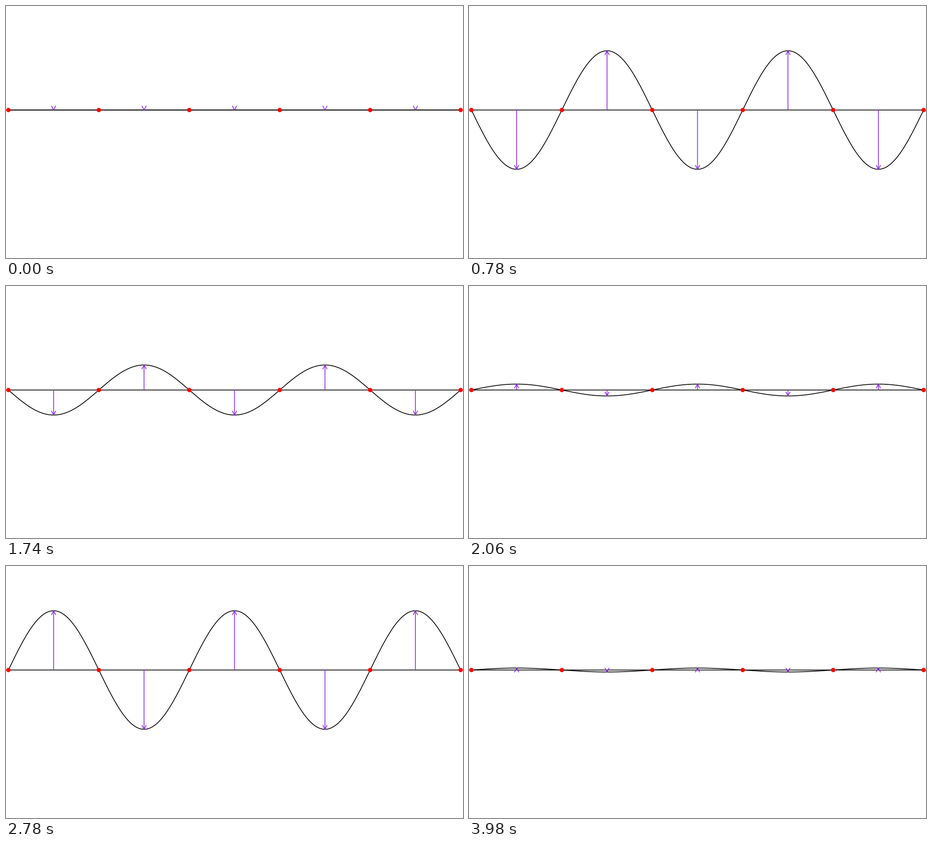
These frames come from a looping animation (1007 by 556 pixels, 4 s). A matplotlib script:

```python
import numpy as np
import matplotlib.pyplot as plt
from matplotlib.animation import FuncAnimation
from matplotlib.patches import Circle

W, H, DPI = 1007, 556, 72
FRAMES, INTERVAL = 200, 20
LOOPS, STEP, AMP = 5, 199.3, 139
XC, YC = W / 2, 229.5
X0, X1 = XC - LOOPS * STEP / 2, XC + LOOPS * STEP / 2
HEAD_W, HEAD_H = 4.8, 9.3
VIOLET = "blueviolet"

fig = plt.figure(figsize=(W / DPI, H / DPI), dpi=DPI, facecolor="white")
ax = fig.add_axes([0, 0, 1, 1])
ax.set(xlim=(0, W), ylim=(H, 0))
ax.axis("off")


def stroke(color, z):
    line, = ax.plot([], [], color=color, lw=1.7, zorder=z, snap=False,
                    solid_capstyle="butt", solid_joinstyle="miter")
    return line


x = np.linspace(X0, X1, 501)
shape = np.sin(np.pi * (x - X0) / STEP)
crests = X0 + STEP * (np.arange(LOOPS) + 0.5)
signs = (-1.0) ** np.arange(LOOPS)

axis = stroke("black", 1)
axis.set_data([X0, X1], [YC, YC])
wave = stroke("black", 2)
stems = [stroke(VIOLET, 3) for _ in crests]
heads = [stroke(VIOLET, 3) for _ in crests]
for k in range(LOOPS + 1):
    ax.add_patch(Circle((X0 + k * STEP, YC), 4.8, fc="red", ec="none",
                        zorder=4))


def update(i):
    # rounding keeps the two flat moments at exactly zero
    a = round(AMP * np.sin(2 * np.pi * i / FRAMES), 9)
    wave.set_data(x, YC + a * shape)
    for cx, s, stem, head in zip(crests, signs, stems, heads):
        tip = YC + a * s
        back = tip - HEAD_H if a * s >= 0 else tip + HEAD_H
        stem.set_data([cx, cx], [YC, tip])
        head.set_data([cx - HEAD_W, cx, cx + HEAD_W], [back, tip, back])
    return [wave, *stems, *heads]


anim = FuncAnimation(fig, update, frames=FRAMES, interval=INTERVAL,
                     repeat=True, repeat_delay=0)
plt.show()
```
